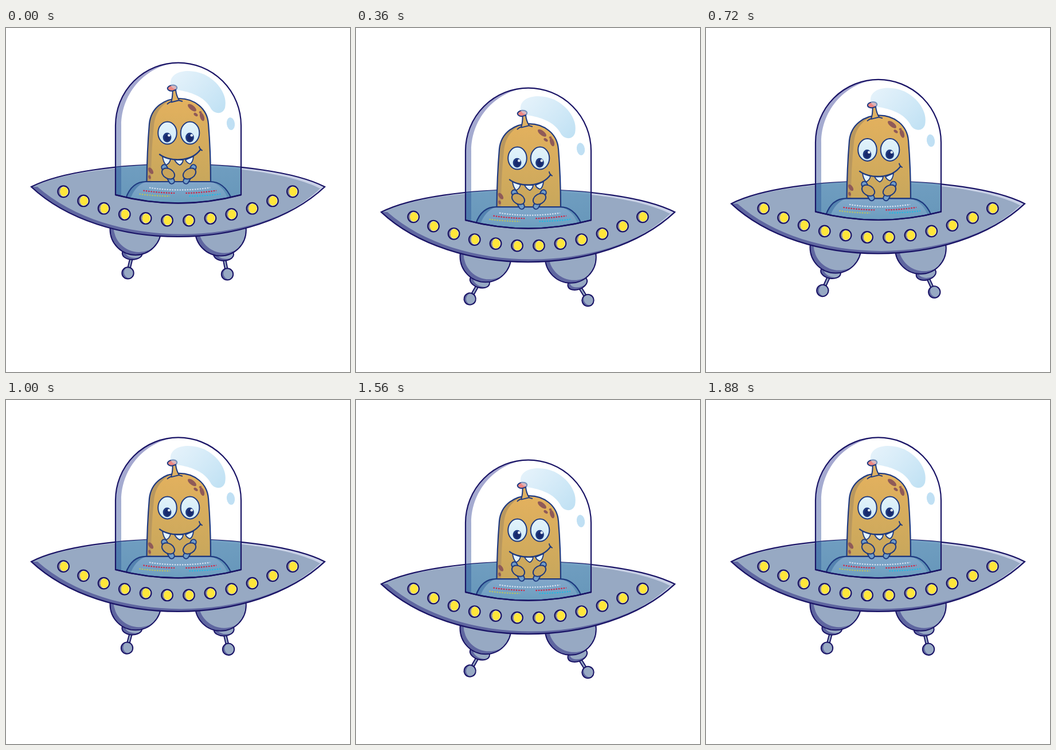
An HTML page with a canvas that plays this animation: 600 px wide and 600 px high, repeating every 1.92 s.

```html
<!DOCTYPE html>
<html lang="en">
<head>
<meta charset="utf-8">
<title>Flying saucer</title>
<style>
html, body { margin: 0; width: 100%; height: 100%; overflow: hidden; background: #fff; }
canvas { display: block; width: 600px; height: 600px; }
</style>
</head>
<body>
<canvas id="stage" width="600" height="600"></canvas>
<script>
const ctx = document.getElementById('stage').getContext('2d');
const LINE = '#1a1466', INK = '#1f3a80', METAL = '#97a9c3', SHADE = '#5f66a0';
const STEP = 40, HALF = 12, RISE = 4.9;
const RAD = Math.PI / 180;

const hull = new Path2D('M44 277C146 224.5 454 224.5 556 277C432 393 168 393 44 277Z');
const dome = new Path2D('M191 291V170A109.5 109.5 0 0 1 410 170V291Q300.5 320 191 291Z');
const domeEdge = new Path2D('M191 291V170A109.5 109.5 0 0 1 300.5 60.5C246 64 201 112 201 170V294Z');
const glare = new Path2D('M287 94C289 74 321 70 346 81C370 93 387 117 382 139C378 152 362 151 356 138C345 120 325 113 305 109C291 107 286 103 287 94Z');
const body = new Path2D('M245.5 268Q246 215 250 167C253 138 277 123 302 123C328 123 351 140 353 167Q357 215 357 268Z');
const bodyShade = new Path2D('M245.5 268Q246 215 250 167C253 145 270 129 286 126C267 137 260 152 258 170Q253 215 253 268Z');
const desk = new Path2D('M209 297C215 280 226 268 244 268H356C373 268 385 279 393 297Q300.5 315 209 297Z');
const deskLeft = new Path2D('M209 297C215 280 226 268 244 268C231 273 221 284 217 299Z');
const deskRight = new Path2D('M356 268C373 268 385 279 393 297L387 298C381 281 371 272 356 268Z');

function paint(path, fill, stroke, width = 2) {
  if (fill) { ctx.fillStyle = fill; ctx.fill(path); }
  if (stroke) { ctx.strokeStyle = stroke; ctx.lineWidth = width; ctx.stroke(path); }
}

function oval(x, y, rx, ry = rx, turn = 0) {
  const p = new Path2D();
  p.ellipse(x, y, rx, ry, turn * RAD, 0, Math.PI * 2);
  return p;
}

function fade(x0, y0, x1, y1, from, to) {
  const g = ctx.createLinearGradient(x0, y0, x1, y1);
  g.addColorStop(0, from);
  g.addColorStop(1, to);
  return g;
}

function within(path, draw) {
  ctx.save();
  ctx.clip(path);
  draw();
  ctx.restore();
}

function shaded(x, y, rx, ry, dx, dy) {
  const p = oval(x, y, rx, ry);
  paint(p, SHADE);
  within(p, () => paint(oval(x + dx, y + dy, rx, ry), METAL));
  paint(p, null, LINE);
}

function segment(x0, y0, x1, y1, color, width) {
  ctx.strokeStyle = color;
  ctx.lineWidth = width;
  ctx.beginPath();
  ctx.moveTo(x0, y0);
  ctx.lineTo(x1, y1);
  ctx.stroke();
}

function leg(g, n) {
  ctx.save();
  ctx.translate(g.px, g.py);
  ctx.rotate(g.turn * n * RAD);
  ctx.translate(-g.px, -g.py);
  segment(g.sx, g.sy, g.bx, g.by, LINE, 6.5);
  segment(g.sx, g.sy, g.bx, g.by, METAL, 2.6);
  shaded(g.bx, g.by, 10.2, 10.2, 3.5, -1);
  shaded(g.cx, g.cy, 17.5, 11, 5, -3);
  ctx.restore();
  shaded(g.x, g.y + n * 0.36, 44.5, 45, 6, -5);
}

const legs = [
  { px: 202, py: 380, turn: 1.82, sx: 218.5, sy: 402, bx: 212.5, by: 427.4, cx: 220.3, cy: 393, x: 226, y: 351 },
  { px: 399.5, py: 379, turn: -2.28, sx: 381, sy: 404, bx: 386, by: 429.4, cx: 379.5, cy: 394.8, x: 374.3, y: 352.5 }
];

function drawHull() {
  paint(hull, '#c9d1e6');
  within(hull, () => {
    ctx.save();
    ctx.translate(-8, 3);
    paint(hull, METAL);
    ctx.restore();
    const below = new Path2D();
    below.rect(0, 277, 600, 200);
    const rim = new Path2D();
    rim.rect(0, 0, 600, 600);
    rim.addPath(hull, new DOMMatrix([1, 0, 0, 1, 6, -4.5]));
    within(below, () => {
      ctx.fillStyle = SHADE;
      ctx.fill(rim, 'evenodd');
    });
  });
  paint(hull, null, LINE, 2.2);
  within(dome, () => paint(hull, fade(0, 238, 0, 308, 'rgba(106,156,192,.88)', 'rgba(96,148,184,.88)')));
}

function drawLights() {
  for (let k = -5.5; k <= 5.5; k++) {
    const dx = 38.1 * k - 0.32 * k * Math.abs(k);
    const x = 300 + dx, y = 336 - 0.00127 * dx * dx;
    const ring = oval(x, y, 9.8);
    paint(ring, '#85859a');
    within(ring, () => {
      paint(oval(x + 3, y, 9, 9.8), '#fff8cf');
      paint(oval(x + 1, y, 6.8, 8), '#ffe63a');
    });
    paint(ring, null, LINE, 2.2);
  }
}

function drawEye(x) {
  paint(oval(x, 183, 16.3, 19.5), fade(0, 164, 0, 203, '#e2f3fb', '#d0eaf7'), INK, 2);
  paint(oval(x - 0.5, 191, 7.4, 8.4), INK);
  paint(oval(x - 0.2, 191.5, 4.8, 5.8), '#182a6c');
  paint(oval(x + 2.8, 187.3, 2.3), '#e8f5fc');
}

function drawHand(x, s) {
  ctx.save();
  ctx.translate(x, 254);
  ctx.scale(s, 1);
  ctx.lineCap = 'round';
  segment(-7, -11, 6, 13, INK, 11.5);
  segment(-7, -11, 6, 13, '#739fc8', 7.5);
  paint(oval(0, 0, 12, 8.5, 32), '#c8a45b', INK, 2);
  ctx.restore();
}

function drawAlien() {
  paint(body, fade(0, 123, 0, 268, '#e3b15e', '#c8a75c'));
  paint(bodyShade, '#b9985f');
  for (const [x, y, rx, ry, a] of [
    [324.5, 139, 9, 4, 38], [331, 151, 4, 2.4, 35], [342, 155, 3.6, 7.5, -18],
    [339, 147, 2.4, 2, 0], [252.5, 249, 3.4, 6.5, -35], [250.5, 260, 2.2, 3.4, -15]
  ]) paint(oval(x, y, rx, ry, a), '#8f5a58');
  paint(body, null, INK, 2.2);

  paint(new Path2D('M287 131Q292 121 290.5 108H296Q297 118 302 127Z'), '#ddb062');
  paint(new Path2D('M281 133Q285 129 288 129Q291 120 290.5 108M296 108Q297 118 302 126Q294 128 288 129.5M301 126L308 128'), null, INK, 2);
  paint(oval(290, 104.7, 8.3, 5, -8), '#ef8781', INK, 2);

  drawEye(281.5);
  drawEye(321);

  for (const d of ['M273 224L287 229Q285 237 279 239Q274 233 273 224Z',
    'M294 230H309Q308 237 303 239Q297 236 294 230Z',
    'M313 230L327 224Q326 234 321 237Q315 235 313 230Z'])
    paint(new Path2D(d), '#e3f3fb', INK, 1.8);
  ctx.lineCap = 'round';
  paint(new Path2D('M268 220.5C284 233 323 235 339.5 211.5'), null, INK, 2.4);
  paint(new Path2D('M337 207Q338 212 342 213.5'), null, INK, 2);
  ctx.lineCap = 'butt';
}

function dots(color, x0, y0, qx, qy, x1, y1) {
  ctx.strokeStyle = color;
  ctx.lineWidth = 2.2;
  ctx.setLineDash([2.4, 2]);
  ctx.beginPath();
  ctx.moveTo(x0, y0);
  ctx.quadraticCurveTo(qx, qy, x1, y1);
  ctx.stroke();
  ctx.setLineDash([]);
}

function drawDesk() {
  within(dome, () => {
    paint(desk, fade(0, 268, 0, 306, '#83a7ca', '#6a9dbe'));
    paint(deskLeft, '#5584b0');
    paint(deskRight, '#5e91b6');
    paint(desk, null, INK, 2.2);
  });
  dots('#d9e2f2', 250, 278.5, 302, 286.5, 356, 278.5);
  dots('#d4203f', 239.5, 283.5, 266, 287.5, 294, 288);
  dots('#d4203f', 313.5, 288, 340, 287.5, 367, 283.5);
  dots('#b9c45f', 232.5, 289.5, 258, 293, 286, 293.2);
  dots('#22b9e2', 319.5, 293.2, 347, 293, 374, 289.5);
}

function drawDome() {
  paint(domeEdge, fade(0, 62, 0, 290, 'rgba(40,40,140,.42)', 'rgba(40,85,150,.42)'));
  paint(glare, fade(300, 78, 375, 148, 'rgba(200,228,246,.5)', 'rgba(150,205,236,.6)'));
  paint(oval(392, 167, 7, 11, -8), '#c0e0f4');
  paint(dome, null, LINE, 2.2);
  paint(new Path2D('M191 291Q300.5 320 410 291'), null, LINE, 2.4);
}

function draw(n) {
  ctx.fillStyle = '#fff';
  ctx.fillRect(0, 0, 600, 600);
  ctx.save();
  ctx.translate(0, n * RISE);
  legs.forEach(g => leg(g, n));
  drawHull();
  drawLights();
  drawAlien();
  drawDesk();
  drawHand(283, 1);
  drawHand(320, -1);
  drawDome();
  ctx.restore();
}

const start = performance.now();
function frame(now) {
  const k = Math.floor(Math.max(0, now - start) / STEP) % (2 * HALF);
  draw(HALF - Math.abs(HALF - k));
  requestAnimationFrame(frame);
}
draw(0);
requestAnimationFrame(frame);
</script>
</body>
</html>
```
